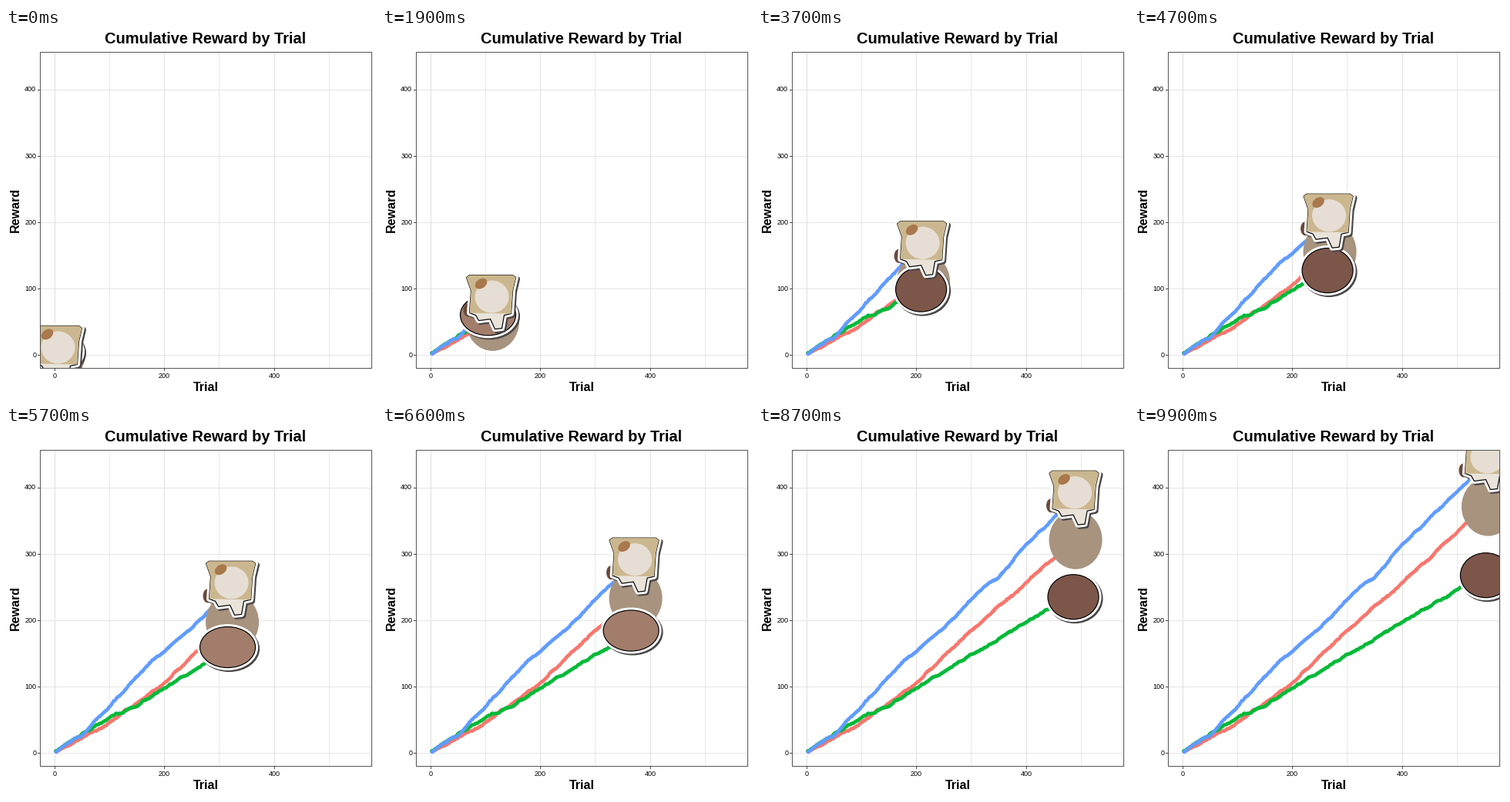
Recreate the animation shown at these times as a matplotlib script. Size 480 by 480 pixels, loop 10 s.

```python
import numpy as np
import matplotlib.pyplot as plt
import matplotlib.patheffects as pe
from matplotlib.animation import FuncAnimation
from matplotlib.patches import Ellipse, Polygon, Rectangle
from matplotlib.transforms import Affine2D

SIZE, DPI = 480, 72  # at 72 dpi one point is one pixel
FRAMES, TRIALS = 100, 550
LEFT, TOP, RIGHT, BOTTOM = 44, 31, 474, 441.3

plt.rcParams["font.family"] = "Liberation Sans"


def px(trial):
    return 62.8 + 0.712 * trial


def py(reward):
    return 424.4 - 0.8615 * reward


fig = plt.figure(figsize=(SIZE / DPI, SIZE / DPI), dpi=DPI, facecolor="white")
ax = fig.add_axes([0, 0, 1, 1])
ax.set(xlim=(0, SIZE), ylim=(SIZE, 0))
ax.axis("off")


def rule(x, y, color):
    ax.plot(x, y, color=color, lw=0.9, zorder=1)


def label(x, y, text, size, ha="center", **style):
    ax.text(x, y, text, size=size, ha=ha, va="baseline", **style)


# Grid, ticks and labels
for trial in range(0, 501, 100):
    x = px(trial)
    major = trial % 200 == 0
    rule([x, x], [TOP, BOTTOM], "#dcdcdc" if major else "#e6e6e6")
    if major:
        rule([x, x], [BOTTOM, BOTTOM + 3], "#333333")
        label(x + 0.3, 454, str(trial), 9)
for reward in range(0, 401, 100):
    y = py(reward)
    rule([LEFT, RIGHT], [y, y], "#e3e3e3")
    rule([LEFT - 3, LEFT], [y, y], "#333333")
    label(39.2, y + 2.6, str(reward), 9, ha="right")

label(259, 19.6, "Cumulative Reward by Trial", 20, weight="bold")
label(259, 471, "Trial", 16, weight="bold")
label(17, 236.2, "Reward", 16, weight="bold", rotation=90, rotation_mode="anchor")

panel = Rectangle((LEFT, TOP), RIGHT - LEFT, BOTTOM - TOP, fc="none", ec="#444444",
                  lw=0.9, zorder=9)
ax.add_patch(panel)

# Each line follows a few (trial, reward) turns with a little random wander
TURNS = {
    "#F8766D": [(0, 1), (100, 45), (200, 105), (300, 184), (400, 257), (550, 370)],
    "#00BA38": [(0, 2), (100, 54), (150, 71), (200, 98), (400, 197), (550, 270)],
    "#619CFF": [(0, 1), (50, 27), (175, 136), (250, 189), (325, 251), (350, 264),
                (400, 313), (550, 433)],
}
rng = np.random.default_rng(4)
trials = np.arange(1, TRIALS + 1)


def walk(turns):
    wander = np.convolve(rng.normal(0, 0.25, TRIALS), np.ones(12), "same")
    return np.maximum(0, np.round(np.interp(trials, *zip(*turns)) + wander))


rewards = [walk(t) for t in TURNS.values()]
lines = [ax.plot([], [], color=c, lw=4.4, solid_capstyle="butt", zorder=2)[0] for c in TURNS]

# Markers: shapes given around (0, 0) and moved to the end of each line
shifts = [Affine2D() for _ in TURNS]
EDGE = [
    pe.Stroke(linewidth=7, foreground="#4a4545", offset=(2, -2)),
    pe.Stroke(linewidth=7, foreground="white"),
    pe.Normal(),
]


def add(shape, k, sticker=False):
    shape.set(transform=shifts[k] + ax.transData, zorder=4 + k, joinstyle="round")
    if sticker:
        shape.set(edgecolor="black", linewidth=1.2, path_effects=EDGE)
    ax.add_patch(shape)
    shape.set_clip_path(panel)
    return shape


add(Ellipse((5, -1), 69, 76, fc="#a8937f"), 0)

pop = add(Ellipse((0, 0), 1, 1), 1, sticker=True)

slice_ = [(-23, -18), (-29, -35), (-25, -38), (31, -38), (35, -35), (31, -18), (29, 12), (-25, 11)]
paws = [(20, 14), (17, 31), (8, 32), (2, 19), (-13, 21), (-17, 14)]
add(Ellipse((-27, 7), 12, 18, fc="#6b4a3c"), 2)
add(Polygon(slice_[:-1] + paws + slice_[-1:], fc="#e9e3da"), 2, sticker=True)
add(Polygon(slice_, fc="#cbb78f"), 2)
add(Ellipse((4, -10), 44, 42, fc="#e6ded4"), 2)
add(Ellipse((-10, -27), 17, 12, angle=-35, fc="#a9784c"), 2)


def update(i):
    now = 1 + (TRIALS - 1) * i / (FRAMES - 1)
    x = px(now)
    seen = trials < now
    for line, values, shift in zip(lines, rewards, shifts):
        y = py(np.interp(now, trials, values))
        line.set_data(np.append(px(trials[seen]), x), np.append(py(values[seen]), y))
        shift.clear().translate(x, y)
    if i % 50 > 25:
        pop.set(width=66, height=58, center=(2, 1), facecolor="#7d564a")
    else:
        pop.set(width=72, height=53, center=(-1, -3), facecolor="#a37d6c")
    return lines


anim = FuncAnimation(fig, update, frames=FRAMES, interval=100, repeat=True, repeat_delay=0,
                     init_func=lambda: update(0))
plt.show()
```
